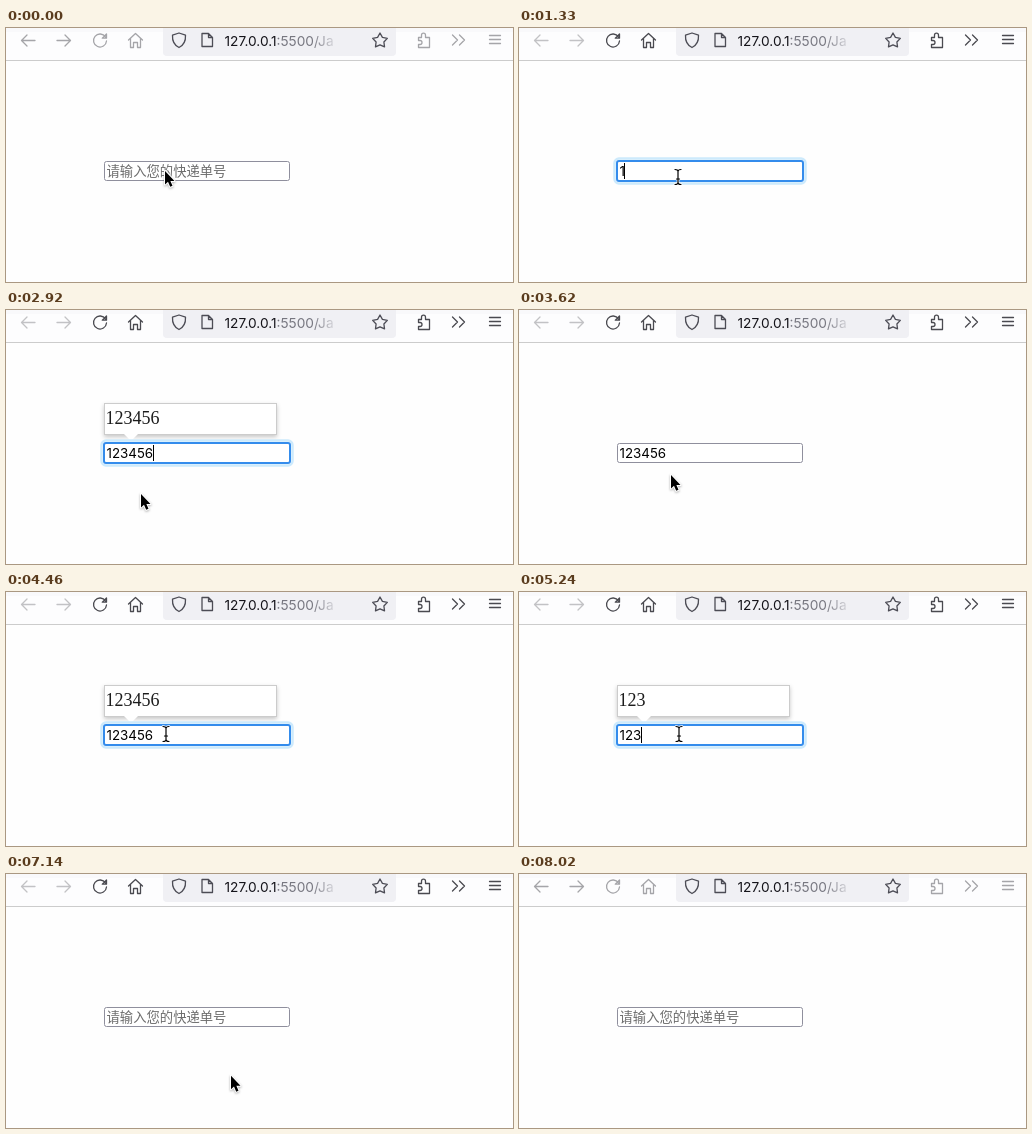
Animation, 507 px wide and 254 px high, one loop 8070 ms. Source, as an HTML page:

```html
<!DOCTYPE html>
<html lang="zh">
<head>
<meta charset="utf-8">
<title>快递单号</title>
<style>
html, body { margin: 0; width: 100%; height: 100%; overflow: hidden; background: #fefefe; }
svg { display: block; width: 507px; height: 254px; }
.line { fill: none; stroke-width: 1.3; stroke-linecap: round; stroke-linejoin: round; }
.ui { font-family: Inter, "Liberation Sans", sans-serif; }
#typed { font-size: 13.33px; white-space: pre; }
#hint { font: 13.33px "Noto Sans CJK SC", "Noto Sans CJK", sans-serif; fill: #6c6c6c; }
#tipText { font: 18px "Liberation Serif", serif; fill: #1c1c1c; }
#tip rect { filter: drop-shadow(0 2px 2px rgba(0,0,0,.22)); }
#nav { stroke: #a5a5a9; }
#tools { stroke: #a5a5a9; }
.active #nav { stroke: #c2c2c5; }
.active #tools { stroke: #4a4a50; }
.halo { paint-order: stroke; stroke: #fff; stroke-linejoin: round; }
</style>
</head>
<body>
<svg id="stage" width="507" height="254">
  <defs>
    <linearGradient id="fade">
      <stop offset="0" stop-color="#f0f0f4" stop-opacity="0"/>
      <stop offset="1" stop-color="#f0f0f4"/>
    </linearGradient>
  </defs>

  <!-- browser toolbar -->
  <rect width="507" height="32" fill="#fdfdfe"/>
  <rect width="507" height="4" fill="#f9f9fb"/>
  <path d="M0 32.5H507" stroke="#ccc"/>
  <path d="M157 0H390V24Q390 28 386 28H161Q157 28 157 24Z" fill="#f0f0f4"/>
  <g id="nav" class="line">
    <path d="M29 12.5H15.5M21 7L15.5 12.5 21 18"/>
    <path d="M51 12.5H64.5M59 7L64.5 12.5 59 18"/>
  </g>
  <g id="tools" class="line">
    <path d="M99.5 9A6.5 6.5 0 1 0 100.5 13M100.5 6V10.2H96.3Z"/>
    <path d="M122.5 12L129.5 5.5 136.5 12M124.5 10.5V19.5H127.5V14.5H131.5V19.5H134.5V10.5"/>
    <path d="M412.5 9.5H415.5V7.2A2 2 0 0 1 419.5 7.2V9.5H423.5V19.5H412.5V16.5H414A2 2 0 0 0 414 12.5H412.5Z"/>
    <path d="M446.5 7L451.5 12 446.5 17M453.5 7L458.5 12 453.5 17"/>
    <path d="M483.5 7.5H494.5M483.5 11.5H494.5M483.5 15.5H494.5"/>
  </g>
  <g class="line" stroke="#4c4c55">
    <path d="M173 5L179.5 7.2Q180 16 173 19.5Q166 16 166.5 7.2Z"/>
    <path d="M196 5.5H202.5L206.5 9.5V18.5H196ZM202.5 5.5V9.5H206.5"/>
    <path id="star"/>
  </g>
  <text class="ui" x="218.5" y="17.5" font-size="13.7" fill="#15141a">127.0.0.1<tspan fill="#777780">:5500/Ja</tspan></text>
  <rect x="306" y="3" width="28" height="22" fill="url(#fade)"/>

  <!-- page -->
  <g id="tip">
    <rect x="98.5" y="93.5" width="172" height="31" fill="#fff" stroke="#ccc"/>
    <path d="M118 124H132L125 131Z" fill="#fff"/>
    <text id="tipText" x="99.5" y="114"></text>
  </g>
  <rect id="plain" x="98.5" y="133.5" width="185" height="19" rx="2" fill="#fff" stroke="#8f8f9d"/>
  <g id="ring" fill="#fff">
    <rect x="95.5" y="130.5" width="191" height="25" rx="4.5" stroke="#cdeafc" stroke-width="2.5"/>
    <rect x="98" y="133" width="186" height="20" rx="2" stroke="#348cec" stroke-width="2"/>
  </g>
  <text id="hint" x="100.5" y="148">请输入您的快递单号</text>
  <text id="typed" class="ui" x="100.5" y="148"></text>
  <rect id="caret" y="135" width="1" height="16"/>

  <path id="arrow" class="halo" stroke-width="2" filter="drop-shadow(0 1px 1px rgba(0,0,0,.3))"
    d="M0 0V13.5L3 10.7 5.2 15.8 7.5 14.8 5.4 9.9H9.5Z"/>
  <g id="beam" fill="none" stroke-linecap="round">
    <path id="beamHalo" stroke="#fff" stroke-width="2.6"/>
    <path id="beamLine" stroke="#000" stroke-width="1.2"/>
  </g>
</svg>
<script>
const $ = id => document.getElementById(id);
const LOOP = 8070, STEP = 50, LAG = 60;

// [start, number of steps, x, y]
const moves = [
  [0, 1, 159, 143], [380, 1, 159, 148], [920, 3, 159, 149], [1800, 1, 160, 150],
  [2580, 2, 163, 158], [2700, 3, 150, 174], [2870, 2, 135, 184],
  [3270, 7, 152, 165], [3740, 1, 160, 142], [6430, 1, 162, 145],
  [6540, 4, 168, 191], [7140, 6, 510, 256]
];
// [time, number of digits in the field]
const edits = [
  [0, 0], [1330, 1], [1450, 2], [1680, 3], [2040, 4], [2220, 5], [2400, 6],
  [4760, 5], [4980, 4], [5180, 3], [5350, 2], [5590, 1], [5830, 0]
];

const within = (t, ...spans) => spans.some(([a, b]) => t >= a && t < b);
const show = (id, on) => $(id).setAttribute("visibility", on ? "visible" : "hidden");
const valueAt = t => "123456".slice(0, edits.findLast(e => e[0] <= Math.max(t, 0))[1]);

function pointer(t) {
  let x = 0, y = 0;
  for (const [start, count, toX, toY] of moves) {
    if (t < start) break;
    const p = Math.min(1, (Math.floor((t - start) / STEP) + 1) / count);
    x += (toX - x) * p;
    y += (toY - y) * p;
  }
  return [x, y];
}

function draw(t) {
  const focused = within(t, [380, 3100], [3800, 6780]);
  const value = valueAt(t), tipValue = valueAt(t - LAG);
  $("stage").classList.toggle("active", within(t, [340, 8020]));
  show("ring", focused);
  show("plain", !focused);
  show("hint", !value);
  $("typed").textContent = value;

  show("tip", within(t, [1450, 3100], [3860, 5890]));
  $("tipText").textContent = tipValue;

  show("caret", focused && !within(t, [920, 1330], [4460, 4760], [6130, 6780]));
  $("caret").setAttribute("x", Math.round(100 + (value && $("typed").getComputedTextLength())));

  const [x, y] = pointer(t);
  const overField = t >= 380 && y > 130 && y < 154;
  show("beam", overField);
  show("arrow", !overField);
  for (const id of ["beam", "arrow"]) $(id).setAttribute("transform", `translate(${x} ${y})`);
}

const starPoints = Array.from({ length: 10 }, (_, i) => {
  const r = i % 2 ? 4.1 : 7.7, a = Math.PI * (i / 5 - 0.5);
  return `${374 + r * Math.cos(a)} ${12.7 + r * Math.sin(a)}`;
});
$("star").setAttribute("d", `M${starPoints.join("L")}Z`);
for (const id of ["beamHalo", "beamLine"])
  $(id).setAttribute("d", "M-3-7.5Q0-7.5 0-5.5Q0-7.5 3-7.5M0-5.5V5.5M-3 7.5Q0 7.5 0 5.5Q0 7.5 3 7.5M-1.5 2H1.5");

const begin = performance.now();
function tick() {
  draw((performance.now() - begin) % LOOP);
  requestAnimationFrame(tick);
}
tick();
</script>
</body>
</html>
```
